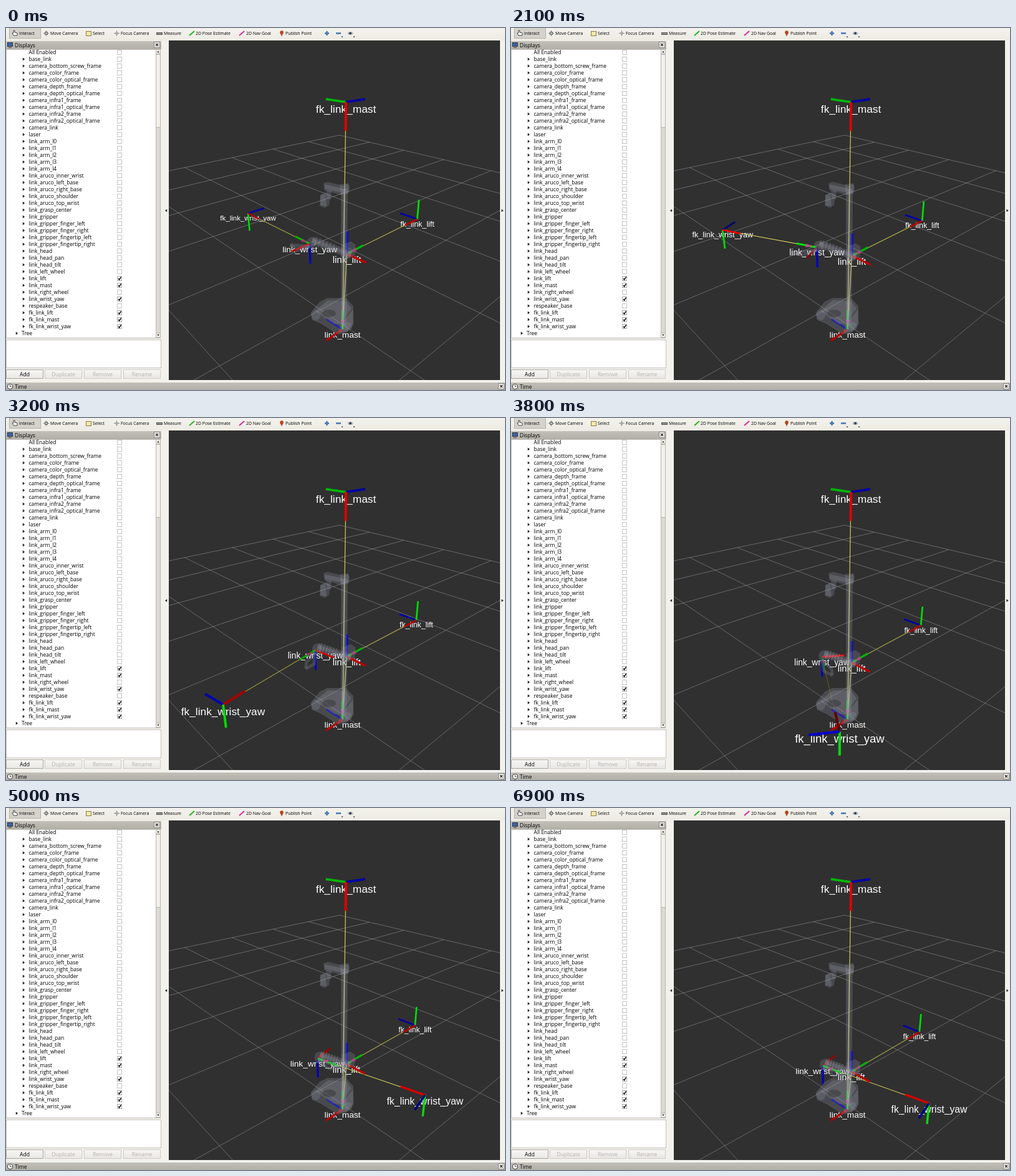
Recreate the animation shown at these times as an HTML page with a canvas. Size 800 px wide and 581 px high, loop 7000 ms.

```html
<!DOCTYPE html>
<html lang="en">
<head>
<meta charset="utf-8">
<title>Frame viewer</title>
<style>
html, body { margin: 0; width: 100%; height: 100%; overflow: hidden; background: #f2f1ec; }
canvas { display: block; width: 800px; height: 581px; }
</style>
</head>
<body>
<canvas id="stage" width="800" height="581"></canvas>
<script>
const ctx = document.getElementById('stage').getContext('2d');
const UI = '"Open Sans", "Noto Sans", sans-serif';
const VIEW = { x: 261, y: 20, w: 531, h: 545 };
const RAD = Math.PI / 180;

// ---------- drawing helpers ----------
function rect(x, y, w, h, fill, line) {
  if (fill) { ctx.fillStyle = fill; ctx.fillRect(x, y, w, h); }
  if (line) {
    ctx.strokeStyle = line; ctx.lineWidth = 1;
    ctx.strokeRect(x + .5, y + .5, w - 1, h - 1);
  }
}
function path(pts, close) {
  ctx.beginPath();
  pts.forEach(p => ctx.lineTo(p[0], p[1]));
  if (close) ctx.closePath();
}
function poly(pts, fill) { path(pts, true); ctx.fillStyle = fill; ctx.fill(); }
function line(pts, color, width = 1) {
  path(pts); ctx.strokeStyle = color; ctx.lineWidth = width; ctx.stroke();
}
function disc(x, y, rx, ry, fill) {
  ctx.beginPath(); ctx.ellipse(x, y, rx, ry, 0, 0, 7);
  ctx.fillStyle = fill; ctx.fill();
}
function text(s, x, y, size, color = '#000', align = 'left', font = UI) {
  ctx.font = `${size}px ${font}`;
  ctx.textAlign = align; ctx.textBaseline = 'alphabetic';
  ctx.fillStyle = color; ctx.fillText(s, x, y);
}
function vGrad(y, h, top, bottom) {
  const g = ctx.createLinearGradient(0, y, 0, y + h);
  g.addColorStop(0, top); g.addColorStop(1, bottom);
  return g;
}

// ---------- camera: x right, y away along the floor, z up ----------
const SIN = Math.sin(23 * RAD), COS = Math.cos(23 * RAD), FOCAL = 659;
const toCam = ([x, y, z]) => [.0645 + x, -.98 + y * SIN + z * COS, 3.4 + y * COS - z * SIN];
const flat = ([x, y, d]) => [527 + x / d * FOCAL, 293 - y / d * FOCAL];
const project = p => flat(toCam(p));
const depth = p => toCam(p)[2];
const add = (p, v, k = 1) => p.map((n, i) => n + v[i] * k);
const mix = (a, b, k) => a.map((n, i) => n + (b[i] - n) * k);
const heading = deg => [Math.cos(deg * RAD), Math.sin(deg * RAD), 0];
const UP = [0, 0, 1], DOWN = [0, 0, -1];

// ---------- motion ----------
const LIFT = [[1600, 0], [2200, .06], [2600, .165], [3000, .275], [3800, .485],
              [4600, .69], [5000, .79], [5400, .885], [5900, .975], [6400, 1]];
const RETRACT = [[1500, 0], [2600, .54], [3800, .92], [4500, 1]];
const YAW = [[1600, 133.5], [2200, 163], [2600, 188], [3000, 217], [3800, 279],
             [4200, 306], [4500, 325], [4700, 327.3]];
function at(keys, t) {
  if (t <= keys[0][0]) return keys[0][1];
  for (let i = 1; i < keys.length; i++) {
    const [a, va] = keys[i - 1], [b, vb] = keys[i];
    if (t < b) return va + (vb - va) * (t - a) / (b - a);
  }
  return keys[keys.length - 1][1];
}

// ---------- 3D scene ----------
function drawGrid() {
  const u = heading(43), v = heading(133), mid = [-.19, .3, -.03];
  const seg = (a, b) => {
    let p = toCam(a), q = toCam(b);
    if (p[2] < .2 && q[2] < .2) return;
    if (p[2] > q[2]) [p, q] = [q, p];
    if (p[2] < .2) p = mix(p, q, (.2 - p[2]) / (q[2] - p[2]));
    line([flat(p), flat(q)], 'rgba(160,160,164,.5)');
  };
  for (let i = -5; i <= 5; i++) {
    seg(add(add(mid, u, i), v, -5), add(add(mid, u, i), v, 5));
    seg(add(add(mid, v, i), u, -5), add(add(mid, v, i), u, 5));
  }
}

const GHOST = 'rgba(150,155,172,.24)', GHOST_LIT = 'rgba(175,180,196,.2)';

function drawBody() {
  // base
  const shell = [[489, 457], [503, 440], [515, 434], [545, 434], [556, 446], [557, 476],
                 [546, 488], [532, 491], [505, 474], [491, 468]];
  poly(shell, GHOST);
  line([...shell, shell[0]], GHOST);
  poly([[495, 454], [516, 437], [545, 438], [554, 450], [536, 476], [526, 475]], GHOST_LIT);
  poly([[536, 476], [556, 452], [556, 474], [546, 487], [533, 489]], GHOST_LIT);
  disc(518, 458, 11, 6, 'rgba(48,48,50,.45)');
  disc(497, 461, 7, 8, GHOST);
  disc(548, 479, 7, 7, GHOST);
  // mast
  poly([[537, 258], [548, 258], [546, 478], [537, 475]], GHOST);
  poly([[540, 258], [544, 258], [543, 478], [540, 477]], GHOST_LIT);
  // head and camera
  poly([[509, 249], [516, 247], [541, 253], [548, 250], [551, 254], [549, 266], [537, 268], [510, 260]], GHOST);
  poly([[511, 251], [539, 257], [537, 264], [511, 258]], GHOST_LIT);
  poly([[535, 251], [549, 249], [550, 264], [537, 267]], GHOST);
  poly([[513, 259], [522, 261], [521, 275], [514, 274]], GHOST);
  poly([[504, 268], [512, 264], [520, 268], [518, 284], [511, 289], [503, 285]], GHOST);
  poly([[504, 268], [512, 266], [514, 286], [504, 285]], GHOST_LIT);
}

function drawArm(lift, wrist, yaw) {
  const a = project(add(wrist, [.02, 0, .035])), b = project(add(lift, [.03, -.02, 0]));
  line([a, b], GHOST, 12);
  line([a, b], GHOST_LIT, 6);
  for (let i = 1; i < 7; i++) {
    const p = mix(a, b, i / 11);
    line([[p[0] + 2, p[1] - 7], [p[0] - 2, p[1] + 7]], GHOST, 2);
  }
  const [lx, ly] = project(lift);
  poly([[lx - 8, ly - 15], [lx + 6, ly - 20], [lx + 14, ly - 15], [lx + 13, ly + 2], [lx - 2, ly + 9], [lx - 9, ly + 3]], GHOST);
  const [wx, wy] = project(wrist);
  disc(wx + 3, wy - 2, 8, 9, GHOST);
  // gripper
  const tip = add(add(wrist, heading(yaw + 18), .2), DOWN, .06);
  [-1, 1].forEach(side => {
    const knee = add(add(add(wrist, heading(yaw + 18), .11), heading(yaw + 108), side * .035), DOWN, .06);
    line([[wx, wy + 4], project(knee), project(tip)], GHOST, 5);
  });
}

// Cylinders seen end-on turn dark
function shade(rgb, dir) {
  const facing = dir[1] * COS - dir[2] * SIN;
  const k = Math.sqrt(Math.max(.06, 1 - facing * facing));
  return `rgb(${rgb.map(n => Math.round(n * Math.min(1, k * 1.05))).join()})`;
}
function drawAxes(o, dirs) {
  const colors = [[235, 0, 0], [0, 228, 10], [0, 0, 205]];
  const order = [0, 1, 2].sort((i, j) => depth(add(o, dirs[j], .19)) - depth(add(o, dirs[i], .19)));
  order.forEach(i => {
    line([project(o), project(add(o, dirs[i], .19))], shade(colors[i], dirs[i]), 10.5 / depth(o));
  });
}
function span(child, parent) {
  const v = add(child, parent, -1), len = Math.hypot(...v);
  return v.map(n => n / len);
}
function drawShaft(child, parent) {
  line([project(child), project(parent)], shade([215, 210, 95], span(child, parent)), 1.2);
}
function drawHead(child, parent) {
  const dir = span(child, parent);
  const near = project(add(parent, dir, .045)), back = project(add(parent, dir, .1));
  const dx = back[0] - near[0], dy = back[1] - near[1], n = Math.hypot(dx, dy) || 1;
  const w = 10 / depth(parent), sx = -dy / n * w, sy = dx / n * w;
  poly([near, [back[0] + sx, back[1] + sy], [back[0] - sx, back[1] - sy]], shade([235, 55, 160], dir));
}
function drawLabel(s, o) {
  const size = 46.6 / depth(o), [x, y] = project(o);
  text(s, x, y + size * .97, size, '#fff', 'center', '"Liberation Sans", Arial, sans-serif');
}

function drawScene(t) {
  const drop = at(LIFT, t), yaw = at(YAW, t);
  const mast = [0, 0, -.006], fkMast = [.009, 0, 1.835];
  const lift = [.028, 0, .707 - .342 * drop];
  const fkLift = add(add(lift, heading(45.8), .95), DOWN, .016);
  const reach = mix([-.2715, .289, 0], [-.207, .185, 0], at(RETRACT, t));
  const wrist = add(reach, UP, lift[2] - .066);
  const out = heading(yaw);
  const fkWrist = add(add(wrist, out, .94), DOWN, .025 * out[1]);
  const labels = { link_mast: mast, fk_link_mast: fkMast, link_lift: lift,
                   fk_link_lift: fkLift, link_wrist_yaw: wrist, fk_link_wrist_yaw: fkWrist };
  const links = [[fkMast, mast], [fkLift, lift], [fkWrist, wrist]];

  ctx.save();
  ctx.beginPath(); ctx.rect(VIEW.x, VIEW.y, VIEW.w, VIEW.h); ctx.clip();
  rect(VIEW.x, VIEW.y, VIEW.w, VIEW.h, '#303030');
  drawGrid();
  for (const name in labels) drawLabel(name, labels[name]);
  [...links, [lift, mast]].forEach(l => drawShaft(...l));

  drawAxes(mast, [heading(225), UP, heading(135)]);
  drawAxes(lift, [heading(-44.2), heading(45.8), UP]);
  drawAxes(wrist, [heading(yaw + 90), out, DOWN]);
  links.forEach(l => drawHead(...l));
  drawBody();
  drawArm(lift, wrist, yaw);

  drawAxes(fkMast, [DOWN, heading(135), heading(45)]);
  drawAxes(fkLift, [heading(225.8), UP, heading(135.8)]);
  drawAxes(fkWrist, [heading(yaw + 180), DOWN, heading(yaw + 270)]);
  ctx.restore();
}

// ---------- window ----------
const ROWS = ('base_link camera_bottom_screw_frame camera_color_frame camera_color_optical_frame ' +
  'camera_depth_frame camera_depth_optical_frame camera_infra1_frame camera_infra1_optical_frame ' +
  'camera_infra2_frame camera_infra2_optical_frame camera_link laser link_arm_l0 link_arm_l1 ' +
  'link_arm_l2 link_arm_l3 link_arm_l4 link_aruco_inner_wrist link_aruco_left_base ' +
  'link_aruco_right_base link_aruco_shoulder link_aruco_top_wrist link_grasp_center link_gripper ' +
  'link_gripper_finger_left link_gripper_finger_right link_gripper_fingertip_left ' +
  'link_gripper_fingertip_right link_head link_head_pan link_head_tilt link_left_wheel link_lift ' +
  'link_mast link_right_wheel link_wrist_yaw respeaker_base fk_link_lift fk_link_mast ' +
  'fk_link_wrist_yaw').split(' ');
const CHECKED = /^(fk_)?link_(lift|mast|wrist_yaw)$/;

// Triangle pointing along (dx, dy)
function arrow(x, y, dx, dy, color = '#222') {
  poly([[x + dx, y + dy], [x - dx - dy * 1.4, y - dy - dx * 1.4], [x - dx + dy * 1.4, y - dy + dx * 1.4]], color);
}
function cross(x, y) {
  rect(x - 5, y - 5, 10, 10, '#eeece8', '#8b8883');
  line([[x - 2, y - 2], [x + 2, y + 2]], '#333', 1.3);
  line([[x + 2, y - 2], [x - 2, y + 2]], '#333', 1.3);
}

function drawToolbar() {
  rect(0, 0, 800, 20, vGrad(0, 20, '#f3f2ec', '#edebe4'));
  rect(5, -2, 51, 19, '#d5d2cc', '#b3b0a9');
  [['Interact', 21], ['Move Camera', 71], ['Select', 139], ['Focus Camera', 184], ['Measure', 253],
   ['2D Pose Estimate', 304], ['2D Nav Goal', 385], ['Publish Point', 448]]
    .forEach(([s, x]) => text(s, x, 11.4, 6.9));
  // hand
  path([[12, 12], [10, 8], [12, 8], [12, 4], [14, 4], [14, 7], [18, 8], [18, 12]], true);
  ctx.fillStyle = '#fff'; ctx.fill(); ctx.strokeStyle = '#444'; ctx.lineWidth = 1; ctx.stroke();
  // move
  line([[60, 8.5], [69, 8.5]], '#777'); line([[64.5, 4], [64.5, 13]], '#777');
  rect(62, 6, 5, 5, '#bbb', '#666');
  // select
  rect(128, 5, 9, 8, '#f5e9a8', '#87794a');
  // focus
  line([[173, 8.5], [182, 8.5]], '#888'); line([[177.5, 4], [177.5, 13]], '#888');
  disc(177.5, 8.5, 2.5, 2.5, '#aaa');
  // ruler
  rect(241, 7, 10, 4, '#8f8f8f', '#555');
  line([[294, 12], [302, 5]], '#22b422', 2);
  line([[374, 12], [382, 5]], '#d42a9a', 2);
  disc(442, 7, 2.8, 2.8, '#b5431c');
  poly([[439.5, 8], [444.5, 8], [442, 13.5]], '#b5431c');
  // plus, minus, eye
  line([[511, 8.5], [518, 8.5]], '#4a78b0', 2.6); line([[514.5, 5], [514.5, 12]], '#4a78b0', 2.6);
  line([[529, 8.5], [537, 8.5]], '#4a78b0', 2.6);
  disc(552, 8.5, 4.5, 2.6, '#b9bfc6'); disc(552, 8.5, 2, 2, '#345');
  arrow(539, 14.5, 0, 1); arrow(558, 14.5, 0, 1);
}

function drawTree() {
  rect(0, 21, 249, 13, vGrad(21, 13, '#c2bfb8', '#b2afa8'));
  rect(2, 23, 9, 7, '#3d63a8', '#333'); rect(4, 31, 5, 1, '#444');
  text('Displays', 14, 30.5, 8.5);
  cross(242, 27);

  rect(0, 34, 248, 464, '#fff', '#bdbab4');
  text('All Enabled', 36.5, 42.3, 8.5);
  const box = (y, on) => {
    rect(178, y - 4, 8, 8, '#fff', on ? '#aaa' : '#c6c4c0');
    if (on) line([[180, y], [181.6, y + 2], [184.5, y - 2.5]], '#111', 1.5);
  };
  box(39, false);
  ROWS.forEach((name, i) => {
    const y = 50 + i * 11;
    arrow(28.5, y, 1.7, 0);
    text(name, 36.5, y + 3.2, 8.5);
    box(y, CHECKED.test(name));
  });
  arrow(17.5, 490, 1.7, 0);
  text('Tree', 25, 493.2, 8.5);

  rect(240, 34, 8, 464, '#dcd9d3', '#b9b6af');
  rect(240, 34, 8, 8, '#efeeea', '#b9b6af');
  rect(240, 42, 8, 118, '#f1f0ec', '#b9b6af');
  rect(240, 489, 8, 8, '#efeeea', '#b9b6af');
  arrow(244, 38, 0, -1.2); arrow(244, 493, 0, 1.2);

  rect(0, 500, 249, 46, '#fff', '#c4c1bb');
  ['Add', 'Duplicate', 'Remove', 'Rename'].forEach((s, i) => {
    const x = i * 62.7 | 0;
    rect(x, 548, 60, 15, vGrad(548, 15, '#f8f7f5', '#e9e7e3'), i ? '#cfccc6' : '#a9a69f');
    text(s, x + 30, 558.7, 8.5, i ? '#b5b2ac' : '#000', 'center');
  });
}

function drawWindow() {
  rect(0, 0, 800, 581, '#f2f1ec');
  drawToolbar();
  drawTree();
  arrow(256.5, 293, -1.6, 0);
  arrow(796, 293, 1.6, 0);
  rect(0, 569, 800, 12, vGrad(569, 12, '#c2bfb8', '#b2afa8'));
  disc(6.5, 575.5, 4.5, 4.5, '#444'); disc(6.5, 575.5, 3.4, 3.4, '#fff');
  line([[6.5, 573], [6.5, 575.5], [8.5, 575.5]], '#333');
  text('Time', 14, 579, 8.5);
  cross(794, 575);
}

// The picture advances in steps of 100 ms
const start = performance.now();
let shown = -1;
function tick() {
  const step = Math.floor((performance.now() - start) % 7000 / 100);
  if (step !== shown) {
    shown = step;
    drawScene(step * 100);
  }
  requestAnimationFrame(tick);
}
drawWindow();
tick();
</script>
</body>
</html>
```
